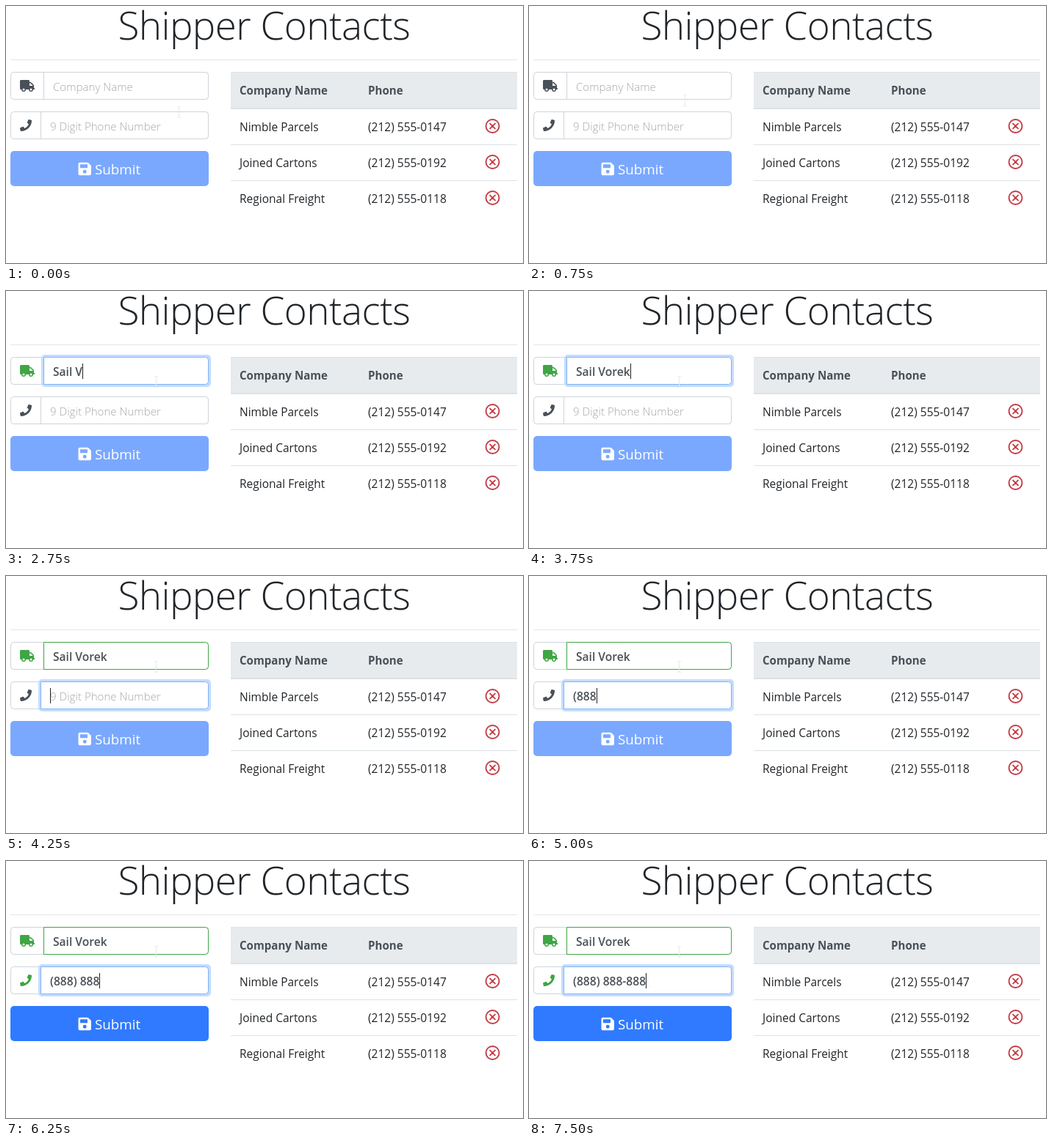
Write an HTML page that moves like this. It is 704x351 px and loops after 8 s.

```html
<!DOCTYPE html>
<html lang="en">
<head>
<meta charset="utf-8">
<title>Shipper Contacts</title>
<style>
html, body { margin: 0; width: 100%; height: 100%; overflow: hidden; background: #fff; }
svg { display: block; }
text { font: 15.5px "Open Sans", "Noto Sans", sans-serif; fill: #212529; white-space: pre; }
.title { font-size: 53px; font-weight: 300; text-anchor: middle; letter-spacing: -.6px; }
.head { font-size: 15.1px; font-weight: 700; fill: #495057; }
.hint { font-size: 15.1px; font-weight: 300; fill: #a6a6a6; }
.typed { font-size: 15.6px; font-weight: 600; fill: #495057; }
.submit { font-size: 18.8px; fill: #fff; }
.box { fill: #fff; stroke: #ced4da; }
.line { stroke: #dee2e6; }
.glow { fill: #c4dcff; }
.caret { stroke: #222; }
.delete { fill: none; stroke: #c43c46; stroke-width: 1.9; stroke-linecap: round; }
</style>
</head>
<body>
<svg id="stage" width="704" height="351" viewBox="0 0 704 351">
  <text class="title" x="351.5" y="46">Shipper Contacts</text>
  <path d="M6 73.5H696" stroke="#e5e5e5"/>
  <g id="table">
    <rect x="306" y="90" width="390" height="50" fill="#e7ebee"/>
    <path class="line" d="M306 90.5H696M306 139.5H696M306 140.5H696M306 189.5H696M306 238.5H696"/>
    <text class="head" x="318" y="121">Company Name</text>
    <text class="head" x="493" y="121">Phone</text>
  </g>
  <g id="form"></g>
  <rect id="button" x="6" y="198" width="270" height="48" rx="5"/>
  <path fill="#fff" fill-rule="evenodd" transform="translate(98.5 212.5) scale(.039)" d="M434 130l-84-84A48 48 0 0 0 316 32H48C21 32 0 53 0 80v352c0 27 21 48 48 48h352c27 0 48-21 48-48V164a48 48 0 0 0-14-34zM224 416a64 64 0 1 1 0-128 64 64 0 0 1 0 128zM320 111V212a12 12 0 0 1-12 12H76a12 12 0 0 1-12-12V108a12 12 0 0 1 12-12h229a12 12 0 0 1 8 4l4 3a12 12 0 0 1 3 8z"/>
  <text class="submit" x="121" y="230">Submit</text>
  <path id="pointer" d="M-2.5 -7.5H-1Q0 -7.5 0 -6.5V6.5Q0 7.5 -1 7.5H-2.5M2.5 -7.5H1Q0 -7.5 0 -6.5M0 6.5Q0 7.5 1 7.5H2.5" fill="none" stroke="#e8e8e8"/>
</svg>
<script>
const LOOP = 8000, STEP = 250;
const GREEN = '#3fa545', DARK = '#495057';
const NAME = 'Sail Vorek', DIGIT = '8';
const TRUCK = 'M624 352h-16V244c0-13-5-25-14-34L494 110c-9-9-21-14-34-14H416V48c0-26-21-48-48-48H48C21 0 0 22 0 48v320c0 27 21 48 48 48h16a96 96 0 0 0 192 0h128a96 96 0 0 0 192 0h48c9 0 16-7 16-16v-32c0-9-7-16-16-16zM160 464a48 48 0 1 1 0-96 48 48 0 0 1 0 96zm320 0a48 48 0 1 1 0-96 48 48 0 0 1 0 96zm80-208H416V144h44l100 100z';
const PHONE = 'M493 25l-104-24c-11-3-23 3-27 14l-48 112c-4 10-1 21 7 28l60 49c-36 77-99 141-177 178l-49-61c-7-8-18-11-28-7l-112 48C4 367-2 378 1 389l24 104C27 504 37 512 48 512c256 0 464-207 464-464 0-11-8-21-19-23z';

const $ = id => document.getElementById(id);
const clamp = (v, lo, hi) => Math.min(hi, Math.max(lo, v));

function add(parent, tag, attrs, text = '') {
  const node = document.createElementNS('http://www.w3.org/2000/svg', tag);
  set(node, attrs);
  node.textContent = text;
  return parent.appendChild(node);
}

function set(node, attrs) {
  for (const key in attrs) node.setAttribute(key, attrs[key]);
}

[['Nimble Parcels', '(212) 555-0147'],
 ['Joined Cartons', '(212) 555-0192'],
 ['Regional Freight', '(212) 555-0118']].forEach(([company, phone], i) => {
  const y = 171 + 49 * i;
  add($('table'), 'text', { x: 318, y }, company);
  add($('table'), 'text', { x: 493, y }, phone);
  add($('table'), 'path', {
    class: 'delete', transform: `translate(662.5 ${y - 7})`,
    d: 'M-9 0A9 9 0 1 1 9 0A9 9 0 1 1 -9 0M-3.4 -3.4L3.4 3.4M3.4 -3.4L-3.4 3.4'
  });
});

function makeField(x, y, hint, icon) {
  const g = add($('form'), 'g', {});
  const right = 276, inset = x + 13;
  add(g, 'rect', { class: 'box', x: 6.5, y: y + .5, width: 269, height: 37, rx: 4 });
  const iconNode = add(g, 'path', {
    d: icon, 'fill-rule': 'evenodd', transform: `translate(19 ${y + 11}) scale(.03125)`
  });
  const glow = add(g, 'rect', { class: 'glow', x: x - 3, y: y - 3, width: right - x + 6, height: 44, rx: 5 });
  const box = add(g, 'path', {
    class: 'box',
    d: `M${x + .5} ${y + .5}H${right - 4.5}a4 4 0 0 1 4 4v29a4 4 0 0 1 -4 4H${x + .5}z`
  });
  const hintNode = add(g, 'text', { class: 'hint', x: inset, y: y + 26 }, hint);
  const typed = add(g, 'text', { class: 'typed', x: inset, y: y + 26 });
  const caret = add(g, 'path', { class: 'caret' });

  return (value, valid, focus, showCaret) => {
    typed.textContent = value;
    typed.style.fontWeight = value.length === 1 ? 400 : 600;
    hintNode.style.display = value ? 'none' : '';
    iconNode.style.fill = valid ? GREEN : DARK;
    glow.style.opacity = focus;
    box.style.stroke = focus ? '#80b4f4' : valid ? GREEN : '#ced4da';
    const end = Math.round(inset + (value ? typed.getComputedTextLength() : 0)) + .5;
    set(caret, { d: `M${end} ${y + 9}v21` });
    caret.style.display = showCaret ? '' : 'none';
  };
}

const drawName = makeField(51, 90, 'Company Name', TRUCK);
const drawPhone = makeField(47, 144, '9 Digit Phone Number', PHONE);

// Three digits are typed in each burst.
const burst = (t, start) => DIGIT.repeat(clamp(Math.floor((t - start) / STEP) + 1, 0, 3));

function phoneText(t) {
  const [a, b, c] = [4500, 5750, 7000].map(start => burst(t, start));
  return (a && '(' + a) + (b && ') ' + b) + (c && '-' + c);
}

function draw(now) {
  const t = Math.floor(now % LOOP / STEP) * STEP;
  const letters = t < 1750 ? 0 : 1 + Math.round((t - 1750) / 2000 * 9);
  const name = NAME.slice(0, letters);
  const phone = phoneText(t);
  const complete = phone.length >= 9;
  const fading = t === 1000 || t === 4000 ? .5 : 1;
  const onName = t >= 1000 && t < 4000, onPhone = t >= 4000;
  const blink = t === 5500 || t === 6750;

  drawName(name, name !== '', t >= 1000 && t <= 4000 ? fading : 0, onName);
  drawPhone(phone, complete, onPhone ? fading : 0, onPhone && !blink);
  $('button').style.fill = complete ? '#307aff' : '#7aa8ff';

  const p = clamp(t / 1000, 0, 1);
  set($('pointer'), { transform: `translate(${Math.round(235 - 31 * p) + .5} ${Math.round(145 - 21 * p)})` });
}

const start = performance.now();
function tick() {
  draw(performance.now() - start);
  requestAnimationFrame(tick);
}
tick();
</script>
</body>
</html>
```
